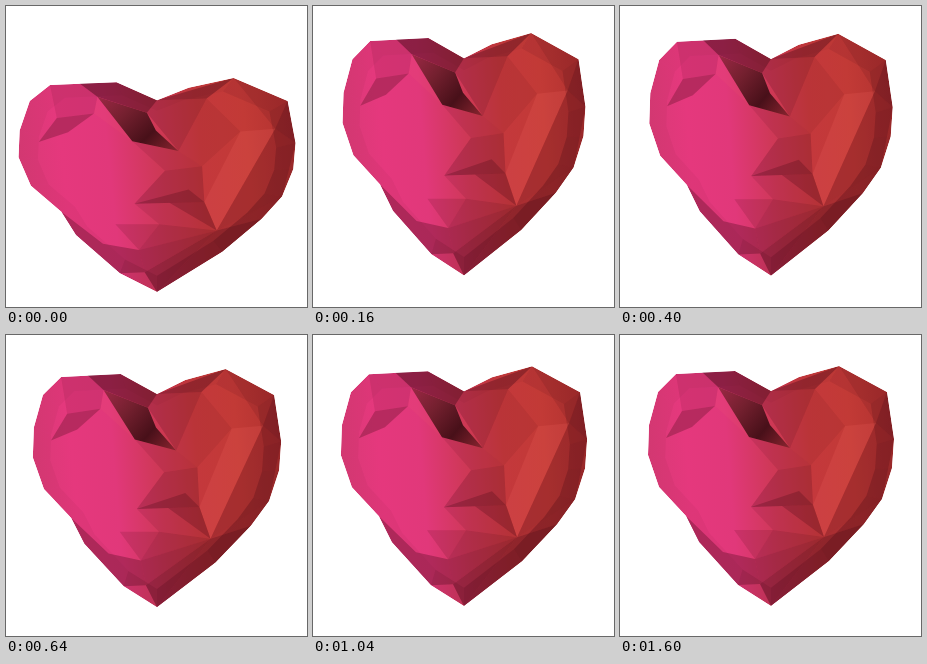
Recreate the animation shown at these times as an HTML page with a canvas. Size 301 by 301 pixels, loop 1920 ms.

```html
<!DOCTYPE html>
<html lang="en">
<head>
<meta charset="utf-8">
<title>Beating heart</title>
<style>
  html, body { margin: 0; width: 100%; height: 100%; overflow: hidden; background: #fff; }
  canvas { display: block; }
</style>
</head>
<body>
<canvas id="stage" width="301" height="301"></canvas>
<script>
const ctx = document.getElementById('stage').getContext('2d');
const LOOP = 1920, STEP = 80;
const WIDTH = 245.5, HEIGHT = 241, LEFT = 28, TOP = 30;
const CENTER = [151, 140];

// Corners on the silhouette, clockwise from the notch.
const notch = [151, 56], peak = [219, 31], shoulder = [267, 57], flank = [274, 104];
const hip = [262, 164], thigh = [244, 189], tip = [151, 271], chin = [118, 250];
const jaw = [79, 207], cheek = [66, 181], crown = [115, 36];
const rim = [notch, [179, 42], peak, shoulder, flank, [272, 133], hip, thigh, [209, 226],
  tip, chin, jaw, cheek, [39, 152], [28, 120], [29, 90], [38, 57], [56, 39], crown];

// Corners inside the silhouette.
const cleftTop = [98, 52], cleftLeft = [129, 102], cleftEnd = [170, 113], cleftRight = [142, 70];
const foldLeft = [131, 172], foldTop = [158, 135], foldMid = [193, 170], foldEnd = [204, 202];
const brow = [191, 130], ridge = [225, 91], temple = [256, 88], arch = [195, 54];
const keel = [135, 224], keelLow = [140, 249], keelLeft = [114, 195], keelRight = [153, 195];

function path(points) {
  ctx.beginPath();
  for (const p of points) ctx.lineTo(...p);
  ctx.closePath();
}

function fill(style, points) {
  path(points);
  ctx.fillStyle = style;
  ctx.fill();
}

const shade = (depth, ...points) => fill(`rgba(65,8,20,${depth})`, points);
const light = (depth, ...points) => fill(`rgba(255,115,105,${depth})`, points);
const toward = (a, b, k) => a.map((v, i) => v + (b[i] - v) * k);

function gradient(from, to, ...colors) {
  const g = ctx.createLinearGradient(...from, ...to);
  colors.forEach((color, i) => g.addColorStop(i / (colors.length - 1), color));
  return g;
}

// Facets around the edge, darker the more they face down and right.
function drawRim() {
  rim.forEach((a, i) => {
    const b = rim[(i + 1) % rim.length];
    const [dx, dy] = toward(a, b, 0.5).map((v, axis) => v - CENTER[axis]);
    const facing = (0.8 * dx + 0.45 * dy) / Math.hypot(dx, dy);
    const depth = 0.04 + 0.26 * Math.max(0, facing);
    shade(depth, a, b, toward(b, CENTER, 0.14), toward(a, CENTER, 0.14));
  });
}

function drawLeftLobe() {
  const crease = [62, 76], creaseEnd = [95, 71];
  shade(0.1, [56, 39], [82, 37], cleftTop, creaseEnd, crease);
  shade(0.28, [46, 103], crease, creaseEnd, [72, 92]);
  shade(0.5, [82, 37], crown, notch, cleftRight, cleftTop);
  light(0.06, creaseEnd, cleftTop, cleftLeft);
}

function drawRightLobe() {
  shade(0.35, notch, peak, arch);
  shade(0.2, notch, arch, cleftEnd, cleftRight);
  shade(0.08, arch, ridge, brow, cleftEnd);
  shade(0.12, peak, shoulder, temple);
  shade(0.3, shoulder, flank, temple);
  light(0.14, ridge, temple, foldEnd, foldMid);
  shade(0.22, temple, flank, hip, foldEnd);
  shade(0.2, hip, thigh, foldEnd);
}

function drawCleft() {
  const glow = gradient(cleftTop, cleftEnd, '#9c2845', '#74202f', '#481019', '#8c2530');
  fill(glow, [cleftTop, cleftRight, [150, 90], cleftEnd, cleftLeft]);
}

function drawFold() {
  shade(0.1, cleftLeft, cleftEnd, brow, foldTop);
  shade(0.2, foldLeft, foldTop, brow, foldMid);
  shade(0.26, foldLeft, toward(foldTop, foldMid, 0.6), foldMid);
  shade(0.1, foldLeft, foldMid, foldEnd, keelRight);
  shade(0.24, toward(foldLeft, foldMid, 0.5), foldMid, foldEnd);
}

function drawBase() {
  shade(0.14, keelLeft, keelRight, keel);
  shade(0.22, keelRight, foldEnd, keel);
  shade(0.3, cheek, [103, 217], keel, keelLow, chin, jaw);
  shade(0.3, keel, foldEnd, keelLow);
  shade(0.42, foldEnd, tip, keelLow);
  shade(0.4, foldEnd, thigh, [209, 226], tip);
}

// Remaining distance of an elastic ease-out.
function swing(time) {
  const p = time / LOOP;
  return 2 ** (-10 * p) * Math.cos(2 * Math.PI * p / 0.3);
}

function draw(time) {
  const e = swing(Math.floor(time / STEP) * STEP);
  ctx.fillStyle = '#fff';
  ctx.fillRect(0, 0, 301, 301);
  ctx.save();
  ctx.translate(LEFT - 15.5 * e, TOP + 41 * e);
  ctx.scale(1 + 31 * e / WIDTH, 1 - 26 * e / HEIGHT);
  ctx.translate(-LEFT, -TOP);
  path(rim);
  ctx.clip();
  fill(gradient([28, 150], [274, 130],
    '#d93a76', '#e5387d', '#e1387a', '#cf3858', '#c4383c', '#c23a36', '#b23230'), rim);
  drawRim();
  drawLeftLobe();
  drawRightLobe();
  drawCleft();
  drawFold();
  drawBase();
  ctx.restore();
}

const start = performance.now();
function tick() {
  draw((performance.now() - start) % LOOP);
  requestAnimationFrame(tick);
}
tick();
</script>
</body>
</html>
```
